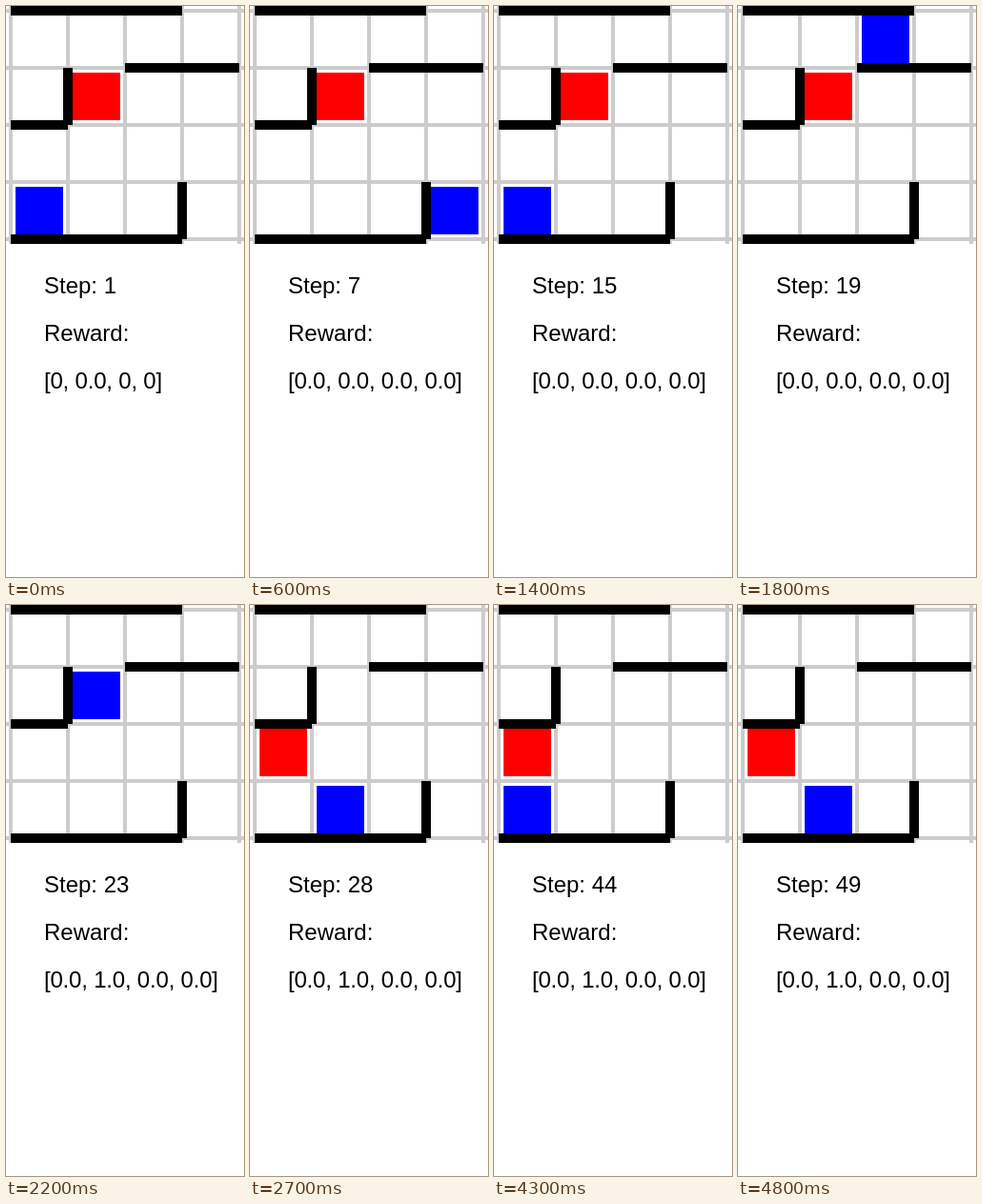
Animation of 250 by 600 pixels, one loop 4900 ms. Source, as an HTML page:

```html
<!DOCTYPE html>
<html lang="en">
<head>
<meta charset="utf-8">
<title>Grid walk</title>
<style>
  html, body { margin: 0; width: 100%; height: 100%; overflow: hidden; background: #fff; }
  svg { display: block; }
  text { font: 24px "Liberation Sans", Arial, sans-serif; fill: #000; }
  #reward { letter-spacing: -0.2px; }
</style>
</head>
<body>
<svg width="250" height="600" viewBox="0 0 250 600">
  <path id="grid" stroke="#ccc" stroke-width="4"/>
  <rect id="goal" width="50" height="50" fill="#f00"/>
  <rect id="agent" width="50" height="50" fill="#00f"/>
  <path stroke="#000" stroke-width="10"
    d="M5 5H185M125 65H245M5 125H65M5 245H185M65 65V125M185 185V245"/>
  <text id="step" x="40" y="302"></text>
  <text x="40" y="352">Reward:</text>
  <text id="reward" x="40" y="402"></text>
</svg>
<script>
const CELL = 60, SIZE = 4, STEP_MS = 100;
const DIRS = { l: [-1, 0], r: [1, 0], u: [0, -1], d: [0, 1], '.': [0, 0] };

// One move per step; a dot is a blocked move. The grid wraps at its edges.
const MOVES = 'ld.url' + '.u.r.d' + '..ldl.' + '..ldd.' +
              'd..r..' + 'l..r..' + 'll....' + '.l.rr.';
const REWARDS = [
  [1, '[0, 0.0, 0, 0]'],
  [2, '[0, 0.0, 0.0, 0]'],
  [5, '[0.0, 0.0, 0.0, 0]'],
  [6, '[0.0, 0.0, 0.0, 0.0]'],
  [23, '[0.0, 1.0, 0.0, 0.0]'],
];
const GOALS = [[1, [1, 1]], [24, [0, 2]]];

const $ = id => document.getElementById(id);
const wrap = n => (n + SIZE) % SIZE;
const at = (table, step) => table.filter(([start]) => start <= step).pop()[1];

const path = [[0, 3]];
for (const move of MOVES) {
  const [x, y] = path[path.length - 1];
  const [dx, dy] = DIRS[move];
  path.push([wrap(x + dx), wrap(y + dy)]);
}

let lines = '';
for (let i = 0; i <= SIZE; i++) {
  const p = 5 + i * CELL;
  lines += `M0 ${p}H250M${p} 0V250`;
}
$('grid').setAttribute('d', lines);

function place(el, [col, row]) {
  el.setAttribute('x', 10 + col * CELL);
  el.setAttribute('y', 10 + row * CELL);
}

function draw(step) {
  place($('goal'), at(GOALS, step));
  place($('agent'), path[step - 1]);
  $('step').textContent = 'Step: ' + step;
  $('reward').textContent = at(REWARDS, step);
}

const start = performance.now();
let shown = 0;
function tick() {
  const elapsed = Math.max(0, performance.now() - start);
  const step = Math.floor(elapsed / STEP_MS) % path.length + 1;
  if (step !== shown) draw(shown = step);
  requestAnimationFrame(tick);
}
tick();
</script>
</body>
</html>
```
